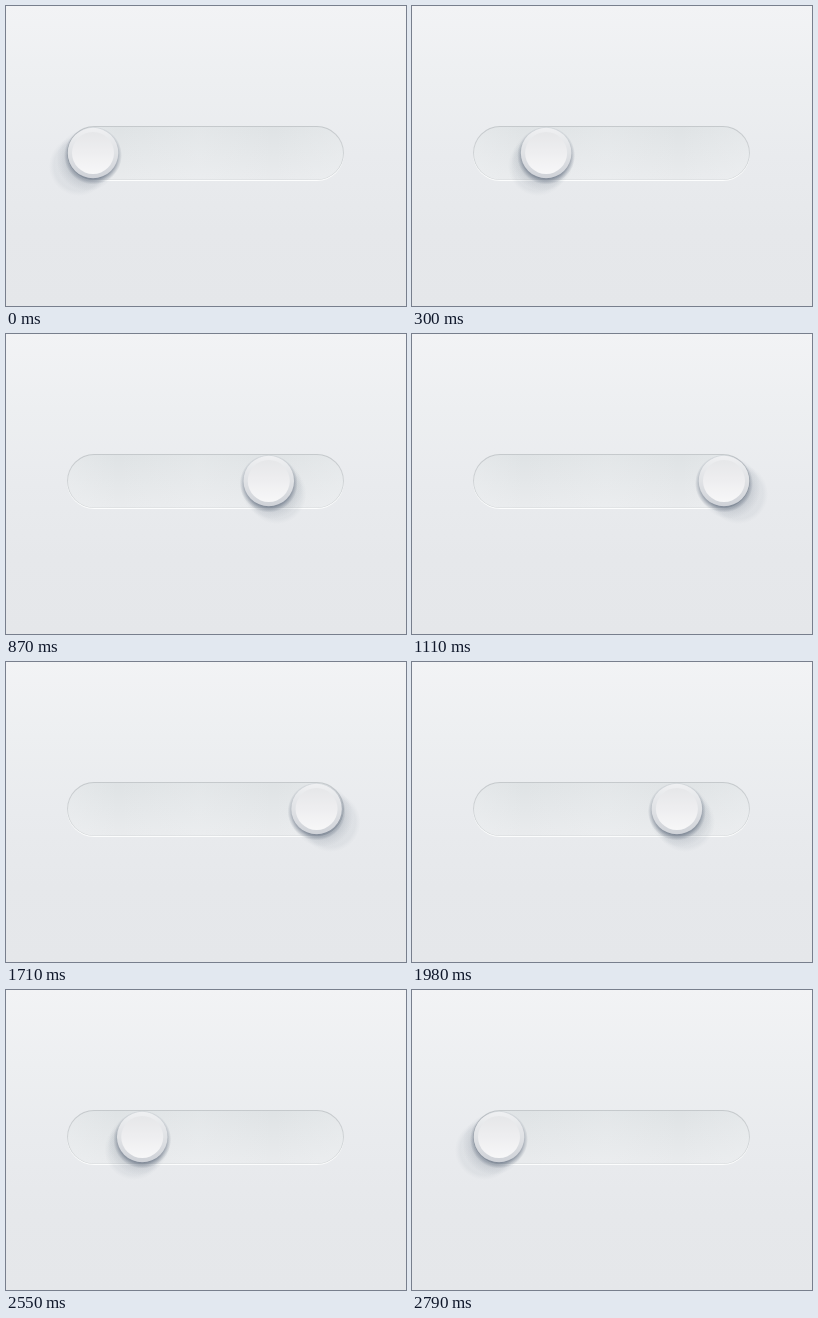
These frames come from a looping animation (400 px wide and 300 px high, 3390 ms). An HTML page with a canvas:

```html
<!DOCTYPE html>
<html lang="en">
<head>
<meta charset="utf-8">
<title>Slider knob</title>
<style>
  html, body { margin: 0; width: 100%; height: 100%; overflow: hidden; }
  canvas { display: block; width: 400px; height: 300px; }
</style>
</head>
<body>
<canvas id="stage" width="400" height="300"></canvas>
<script>
const ctx = document.getElementById('stage').getContext('2d');

const LOOP = 3390, TICK = 30, STEPS = 37, RETURN_TICK = 56;
const LEFT = 87, TRAVEL = 225, MIDDLE = 199.5, KNOB_Y = 147;

// Cubic Bézier easing with control points (.166, 0) and (.934, 1).
function ease(p) {
  let lo = 0, hi = 1;
  for (let i = 0; i < 30; i++) {
    const s = (lo + hi) / 2, u = 1 - s;
    const x = 3 * u * u * s * 0.166 + 3 * u * s * s * 0.934 + s ** 3;
    if (x < p) lo = s; else hi = s;
  }
  return lo * lo * (3 - 2 * lo);
}

const progress = tick => ease(Math.min(1, Math.max(0, tick / STEPS)));

function knobX(time) {
  const tick = Math.floor((time % LOOP) / TICK);
  return LEFT + TRAVEL * (progress(tick) - progress(tick - RETURN_TICK));
}

function linear(x0, y0, x1, y1, stops) {
  const g = ctx.createLinearGradient(x0, y0, x1, y1);
  stops.forEach(([at, color]) => g.addColorStop(at, color));
  return g;
}

const vertical = (y0, y1, stops) => linear(0, y0, 0, y1, stops);

function pill(x, y, w, h, fill) {
  ctx.fillStyle = fill;
  ctx.beginPath();
  ctx.roundRect(x, y, w, h, h / 2);
  ctx.fill();
}

function disc(x, y, r, fill) {
  ctx.fillStyle = fill;
  ctx.beginPath();
  ctx.arc(x, y, r, 0, Math.PI * 2);
  ctx.fill();
}

function shadow(x, y, inner, outer, rgb, alpha) {
  const g = ctx.createRadialGradient(x, y, inner, x, y, outer);
  g.addColorStop(0, `rgba(${rgb},${alpha})`);
  g.addColorStop(0.5, `rgba(${rgb},${alpha * 0.45})`);
  g.addColorStop(1, `rgba(${rgb},0)`);
  disc(x, y, outer, g);
}

function drawBackground() {
  ctx.fillStyle = vertical(0, 300, [
    [0, '#f2f3f5'], [0.25, '#edeff1'], [0.5, '#e9ebee'],
    [0.75, '#e6e8eb'], [1, '#e5e7ea']
  ]);
  ctx.fillRect(0, 0, 400, 300);
}

function drawTrack() {
  pill(61, 121, 277, 54, '#fcfdfd');
  pill(61, 120, 277, 54, vertical(120, 174, [
    [0, '#c5c9cc'], [0.5, '#cdd1d4'], [1, '#d5d8da']
  ]));
  pill(62, 121, 275, 52.5, vertical(121, 174, [
    [0, '#dfe3e5'], [0.5, '#e4e7e9'], [1, '#e9ebed']
  ]));
  pill(62, 121, 275, 52.5, linear(62, 0, 337, 0, [
    [0, 'rgba(240,242,244,.35)'], [0.18, 'rgba(240,242,244,0)'],
    [0.48, 'rgba(240,242,244,.25)'], [0.75, 'rgba(240,242,244,0)'],
    [1, 'rgba(240,242,244,.35)']
  ]));
}

function drawKnob(x) {
  const lean = (x - MIDDLE) * 0.125;
  shadow(x + lean, KNOB_Y + 13, 25, 30, '80,98,115', 0.07);
  shadow(x + lean * 0.4, KNOB_Y + 7, 19, 31, '85,98,115', 0.2);
  shadow(x, KNOB_Y + 2.5, 23, 29, '75,88,108', 0.55);
  disc(x, KNOB_Y, 25.3, vertical(122, 172, [
    [0, '#eff0f2'], [0.5, '#e0e2e5'], [1, '#cfd2d8']
  ]));
  disc(x, KNOB_Y, 21, vertical(126, 168, [
    [0, '#e6e7e9'], [0.5, '#eeeef0'], [1, '#f7f7f8']
  ]));
}

function frame() {
  drawBackground();
  drawTrack();
  drawKnob(knobX(performance.now()));
  requestAnimationFrame(frame);
}

frame();
</script>
</body>
</html>
```
